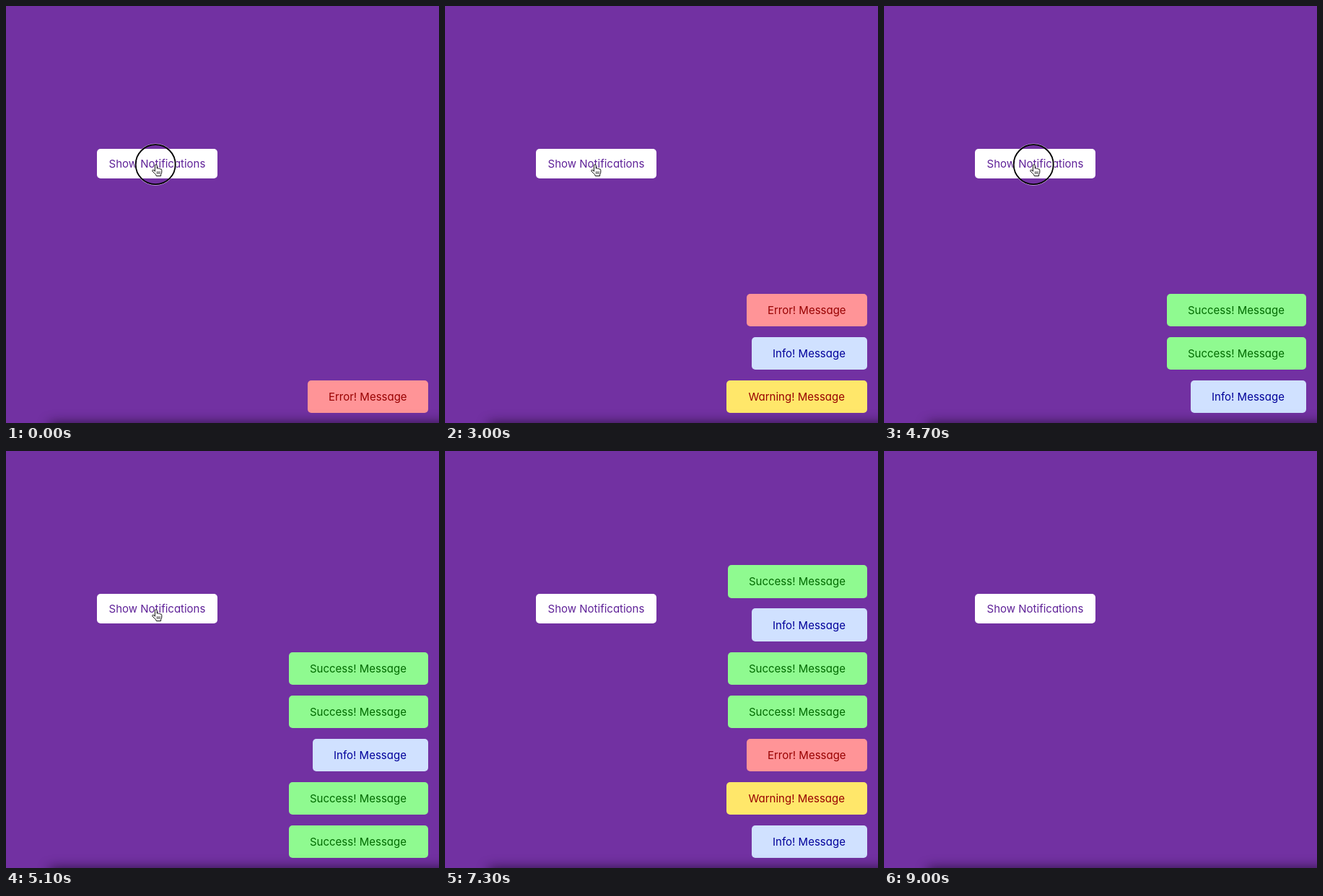
These frames come from a looping animation (600x578 px, 9.2 s). An HTML page:

```html
<!DOCTYPE html>
<html lang="en">
<head>
<meta charset="utf-8">
<title>Toast notifications</title>
<style>
  html, body { margin: 0; width: 100%; height: 100%; overflow: hidden; }
  body {
    position: relative;
    background: #7231a2;
    font: 400 15px/1 Inter, "Open Sans", sans-serif;
    font-feature-settings: "cv11";
  }
  .button, .toast {
    display: flex;
    align-items: center;
    justify-content: center;
    border-radius: 5px;
    white-space: nowrap;
  }
  .button {
    position: absolute;
    left: 126px;
    top: 198px;
    width: 167px;
    height: 40.5px;
    background: #fff;
    color: #5f2298;
  }
  .toasts {
    position: absolute;
    right: 15.5px;
    bottom: 13.8px;
    display: flex;
    flex-direction: column;
    align-items: flex-end;
    gap: 14.8px;
  }
  .toast { height: 45.3px; }
  .error { width: 166.5px; background: #ff9497; color: #980000; }
  .info { width: 160px; background: #d0e1ff; color: #00009a; }
  .success { width: 193px; background: #8ffa90; color: #006b00; }
  .warning { width: 194.5px; background: #ffe76a; color: #980000; }
  .shade {
    position: absolute;
    left: 62px;
    top: 579px;
    width: 700px;
    height: 40px;
    box-shadow: 0 0 16px 1px rgba(20, 10, 30, .75);
  }
  svg { position: absolute; left: 0; top: 0; }
</style>
</head>
<body>
<div class="button">Show Notifications</div>
<div class="toasts"></div>
<div class="shade"></div>
<svg width="600" height="578" fill="none">
  <g id="ring">
    <circle cx="207.2" cy="219.7" r="28.6" stroke="#fff" stroke-opacity=".65"/>
    <circle cx="207.2" cy="219.7" r="27.5" stroke="#000" stroke-width="1.8"/>
  </g>
  <g id="hand" transform="translate(202 219)" stroke="#111" stroke-linejoin="round" stroke-linecap="round">
    <path fill="#fff" d="M4.4 9.8V2.2a1.4 1.4 0 0 1 2.8 0V6.2q1.3-.8 2.3.3 1.5-.6 2.3.5 2-.2 2 1.5V11q0 2-1.2 3.6v2H6.3l-.6-1.8Q3.6 13 1.1 10 .2 8.6 1.4 8.2 2.9 8 4.4 9.8Z"/>
    <path stroke-width=".8" d="M7.4 10.6v2.9m1.9-2.9v2.9m1.9-2.9v2.9"/>
  </g>
</svg>
<script>
  const LOOP = 9200, LIFE = 3000, PRESS = 100, HAND_HIDES = 7000;

  const toasts = [
    [-200, "error"], [100, "error"], [400, "info"], [800, "warning"],
    [4000, "success"], [4400, "success"], [4600, "info"], [4800, "success"],
    [5100, "success"], [5300, "error"], [5500, "warning"], [5900, "info"]
  ];
  const presses = [0, 300, 700, 3900, 4300, 4500, 4700, 5000, 5200, 5400, 5900];

  const stack = document.querySelector(".toasts");
  const ring = document.getElementById("ring");
  const hand = document.getElementById("hand");

  const items = toasts.map(([start, kind]) => {
    const el = document.createElement("div");
    el.className = "toast " + kind;
    el.textContent = kind[0].toUpperCase() + kind.slice(1) + "! Message";
    stack.append(el);
    return { el, start };
  });

  const within = (t, start, length) => t >= start && t < start + length;
  const show = (el, visible) => { el.style.display = visible ? "" : "none"; };

  function draw(now) {
    const t = now % LOOP;
    items.forEach(({ el, start }) => show(el, within(t, start, LIFE)));
    show(ring, presses.some(start => within(t, start, PRESS)));
    show(hand, t < HAND_HIDES);
  }

  const origin = performance.now();
  function tick() {
    draw(performance.now() - origin);
    requestAnimationFrame(tick);
  }
  tick();
</script>
</body>
</html>
```
